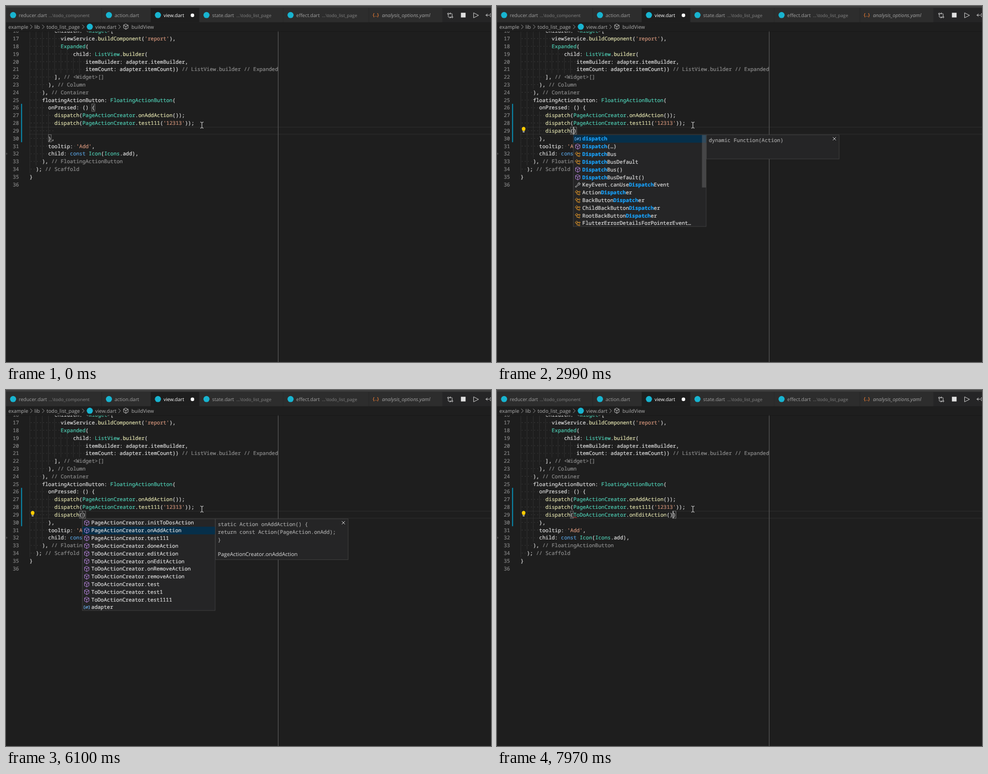
Animation, 874 px wide and 641 px high, one loop 8000 ms. Source, as an HTML page:

```html
<!DOCTYPE html>
<html lang="en">
<head>
<meta charset="utf-8">
<title>Editor completion</title>
<style>
html, body { margin: 0; width: 100%; height: 100%; overflow: hidden; background: #1e1e1e; }
svg { display: block; width: 874px; height: 641px; }
text { white-space: pre; text-rendering: geometricPrecision; }
.code { --ink: #dadada; font: 9.333px "Noto Sans Mono", monospace; }
.code, .code tspan { fill: var(--ink); stroke: var(--ink); stroke-width: .22px; }
.ui { font-family: "Open Sans", sans-serif; }
.num { --ink: #858585; text-anchor: end; }
.com { --ink: #8a8a8a; }
.str { --ink: #ce9178; }
.key { --ink: #569cd6; }
.type { --ink: #4ec9b0; }
.fn { --ink: #dcdcaa; }
.hit { --ink: #18a3ff; font-weight: bold; }
.doc { --ink: #a3a3a3; }
.line { fill: none; stroke-linejoin: round; stroke-linecap: round; }
</style>
</head>
<body>
<svg viewBox="0 0 874 641">
  <g id="page"></g>
  <g id="live"></g>
  <g id="popup"></g>
  <g id="chrome"></g>
  <path class="line" stroke="#d8d8d8" stroke-width="1" d="M350.500 209Q353 209 353 210.500V218.500Q353 220 350.500 220M355.500 209Q353 209 353 210.500M353 218.500Q353 220 355.500 220"/>
</svg>
<script>
const X0 = 42.5, CW = 5.6, LH = 13.82, ROW = 29;
const $ = id => document.getElementById(id);
const colX = c => X0 + c * CW;
const lineY = n => 58.7 + (n - 17) * LH;
const esc = s => s.replace(/&/g, '&amp;').replace(/</g, '&lt;');
const rect = (x, y, w, h, fill, more = '') =>
  `<rect x="${x}" y="${y}" width="${w}" height="${h}" fill="${fill}" ${more}/>`;
const stroke = (d, color, w = 0.8) =>
  `<path class="line" d="${d}" stroke="${color}" stroke-width="${w}"/>`;
const at = (x, y, body) => `<g transform="translate(${x} ${y})">${body}</g>`;
const disc = (x, y, r, fill) => `<circle cx="${x}" cy="${y}" r="${r}" fill="${fill}"/>`;
const mono = (x, y, markup, cls = '') =>
  `<text class="code ${cls}" x="${x}" y="${y + 3.4}">${markup}</text>`;
const ui = (x, y, s, size, fill, more = '') =>
  `<text class="ui" x="${x}" y="${y + 3.3}" font-size="${size}" fill="${fill}" ${more}>${esc(s)}</text>`;

const TOKEN = /(\/\/.*)|('[^']*')|(\bconst\b)|(\b[A-Z]\w+)|(\b[a-z]\w*(?=\())/g;
const KINDS = ['com', 'str', 'key', 'type', 'fn'];

function highlight(s) {
  let out = '', last = 0;
  for (const m of s.matchAll(TOKEN)) {
    const kind = KINDS[m.slice(1).findIndex(Boolean)];
    out += esc(s.slice(last, m.index)) + `<tspan class="${kind}">${esc(m[0])}</tspan>`;
    last = m.index + m[0].length;
  }
  return out + esc(s.slice(last));
}

// Text with its indent guides and whitespace dots
function codeLine(n, indent, s) {
  const y = lineY(n);
  let guides = '', dots = '';
  for (let c = 0; c < indent; c++) {
    if (c % 2 === 0) guides += `M${colX(c) + 0.4} ${y - LH / 2}v${LH}`;
    dots += `M${colX(c) + CW / 2} ${y}h.1`;
  }
  const src = s.split(' //')[0];
  for (let i = 0; i < src.length; i++)
    if (src[i] === ' ') dots += `M${colX(indent + i) + CW / 2} ${y}h.1`;
  return stroke(guides, '#363636', 0.73) + stroke(dots, '#484848', 1.2) +
    mono(colX(indent), y, highlight(s));
}

const box = (n, c) =>
  rect(colX(c) + 0.2, lineY(n) - 6.5, CW - 0.2, LH - 0.9, 'none', 'stroke="#888" stroke-width=".75"');

function squiggle(from, to) {
  const y = lineY(ROW) + 5.6;
  let d = `M${colX(from)} ${y}`;
  for (let i = 1, x = colX(from) + 1.45; x <= colX(to) + 0.3; x += 1.45, i++)
    d += `L${x} ${y - (i % 2) * 1.6}`;
  return stroke(d, '#f14c4c', 0.8);
}

const icons = {
  cube: (color = '#b180d7') =>
    stroke('M0-4.600L4-2.600V2.400L0 4.600L-4 2.400V-2.600ZM-4-2.600L0-.4L4-2.600M0-.4V4.600', color, 0.9),
  cls: () => stroke('M-4.300-1.700L-1.700-4.200L.2-2.300L-2.400.3ZM-.5-1.500H2M-1.400-.6V3H1.600M2-1.500L3.200-2.700L4.600-1.400L3.300-.1ZM1.600 3L2.900 1.700L4.300 3L3 4.300Z', '#ee9d28', 0.95),
  field: () => stroke('M-3.400-2.600H-4.800V2.600H-3.400M3.400-2.600H4.800V2.600H3.400M-2 0A2 1.700 0 1 1 2 0A2 1.700 0 1 1-2 0M-2 1.700L2-1.700', '#75beff', 0.85),
  tool: () => stroke('M-4 3L.2-1.200A2.600 2.600 0 0 1 3.300-4.200L1.700-2.500L2.800-1.400L4.400-3A2.600 2.600 0 0 1 1.300.1L-2.900 4.200Q-4.300 4.400-4 3Z', '#c5c5c5', 0.85)
};

const SOURCE = [
  [8, 'children: <Widget>['],
  [10, "viewService.buildComponent('report'),"],
  [10, 'Expanded('],
  [14, 'child: ListView.builder('],
  [18, 'itemBuilder: adapter.itemBuilder,'],
  [18, 'itemCount: adapter.itemCount)) // ListView.builder // Expanded'],
  [8, '], // <Widget>[]'],
  [6, '), // Column'],
  [4, '), // Container'],
  [4, 'floatingActionButton: FloatingActionButton('],
  [6, 'onPressed: () {'],
  [8, 'dispatch(PageActionCreator.onAddAction());'],
  [8, "dispatch(PageActionCreator.test111('12313'));"],
  null,
  [6, '},'],
  [6, "tooltip: 'Add',"],
  [6, 'child: const Icon(Icons.add),'],
  [4, '), // FloatingActionButton'],
  [2, '); // Scaffold'],
  [0, '}'],
  [0, '']
];

function drawPage() {
  const top = lineY(ROW) - LH / 2;
  let out = rect(42, top, 832, 1.2, '#2b2b2b') + rect(42, top + LH - 1.2, 832, 1.2, '#2b2b2b');
  out += rect(490, 45, 1, 596, '#5a5a5a');
  out += rect(27, lineY(26) - LH / 2, 2.1, LH * 5, '#0c7d9d');
  SOURCE.forEach((row, i) => {
    const n = 16 + i;
    out += mono(23.4, lineY(n), n, 'num');
    if (row) out += codeLine(n, ...row);
  });
  return out + stroke('M0 266H2.500M1 264.500V267.500', '#5c5c5c', 0.7);
}

const DART = '#18b4d0';
// left edge, right edge, name, folder, folder x
const TABS = [
  [0, 172, 'reducer.dart', '...\\todo_component', 77],
  [172.7, 260.5, 'action.dart'],
  [261, 348, 'view.dart'],
  [348.5, 499.5, 'state.dart', '...\\todo_list_page', 415],
  [500, 653.5, 'effect.dart', '...\\todo_list_page', 569.5],
  [654.3, 786.5, 'analysis_options.yaml']
];

function drawChrome() {
  let out = rect(0, 0, 874, 45.5, '#1e1e1e') + rect(0, 45.5, 874, 1, '#161616', 'opacity=".6"') +
    rect(0, 0, 874, 3.6, '#3c3c3c') + rect(0, 3.6, 874, 25.6, '#252526');
  TABS.forEach(([x, end, name, folder, fx], i) => {
    const active = i === 2, yaml = i === 5;
    out += rect(x, 3.6, end - x, 25.6, active ? '#1e1e1e' : '#2d2d2d');
    out += yaml ? ui(x + 6.5, 15.5, '{..}', 8.5, '#e37933', 'font-weight="600"')
      : disc(x + 12.8, 16.3, 5.5, DART);
    out += yaml ? ui(677.5, 16.7, name, 9.05, '#a2a2a2', 'font-style="italic"')
      : ui(x + 23, 16.7, name, 8.75, active ? '#fff' : '#a2a2a2');
    if (folder) out += ui(fx, 16.7, folder, 8.05, '#848484');
  });
  out += disc(336, 16.7, 3.2, '#fff');

  const pale = '#d0d0d0';
  out += at(800.5, 17, stroke('M-3.500-1.500V2Q-3.500 3.500-2 3.500H1M-.5 2L1 3.500L-.5 5M3.500 1.500V-2Q3.500-3.500 2-3.500H-1M.5-5L-1-3.500L.5-2M-4.800-3A1.300 1.300 0 1 1-2.200-3A1.300 1.300 0 1 1-4.800-3M2.200 3A1.300 1.300 0 1 1 4.800 3A1.300 1.300 0 1 1 2.200 3', pale, 0.9));
  out += rect(819.8, 12.2, 8.4, 8.4, '#e0e0e0');
  out += stroke('M843 12.500L851.500 16.800L843 21.100Z', pale, 0.95);
  out += stroke('M870 16.500H865M867.500 14L865 16.500L867.500 19M874.500 13A3.700 3.700 0 0 0 874.500 20', pale, 0.95);

  const crumb = (x, s) => ui(x, 37.5, s, 9, '#b0b0b0');
  out += crumb(4.3, 'example') + crumb(51, 'lib') + crumb(73, 'todo_list_page') +
    crumb(160.8, 'view.dart') + crumb(226, 'buildView');
  for (const x of [44, 65.5, 137.5, 203])
    out += stroke(`M${x} 34l3.300 3.500l-3.300 3.500`, '#a0a0a0', 0.9);
  return out + disc(151, 37.3, 5.5, DART) + at(216, 37.3, icons.cube('#c5c5c5'));
}

const creators = ['initToDosAction', 'onAddAction', 'test111'].map(s => 'PageActionCreator.' + s)
  .concat(['doneAction', 'editAction', 'onEditAction', 'onRemoveAction', 'removeAction',
    'test', 'test1', 'test1111'].map(s => 'ToDoActionCreator.' + s));
const LISTS = {
  names: [
    ['field', 'dispatch'], ['cube', 'Dispatch(…)'], ['cls', 'DispatchBus'],
    ['cls', 'DispatchBusDefault'], ['cube', 'DispatchBus()'], ['cube', 'DispatchBusDefault()'],
    ['tool', 'KeyEvent.canUseDispatchEvent'], ['cls', 'ActionDispatcher'],
    ['cls', 'BackButtonDispatcher'], ['cls', 'ChildBackButtonDispatcher'],
    ['cls', 'RootBackButtonDispatcher'], ['cls', 'FlutterErrorDetailsForPointerEvent…']
  ],
  actions: [...creators.map(s => ['cube', s]), ['field', 'adapter']]
};
const DOCS = [
  ['initToDosAction(List<ToDoState> toDos)', 'Action(PageAction.initToDos, payload: toDos)'],
  ['onAddAction()', 'const Action(PageAction.onAdd)'],
  ['test111(String str)', 'Action(PageAction.test111, payload: str)'],
  ['doneAction(String uniqueId)', 'Action(ToDoAction.done, payload: uniqueId)'],
  ['editAction(ToDoState toDo)', 'Action(ToDoAction.edit, payload: toDo)'],
  ['onEditAction(String uniqueId)', 'Action(ToDoAction.onEdit, payload: uniqueId)']
];
const FRAME = 'stroke="#454545" stroke-width=".75"';
const wrap = s => s.match(/.{1,38}/g);

function drawDocs(s) {
  const named = s.list === 'names';
  const [head, body] = DOCS[s.sel];
  const lines = named ? ['dynamic Function(Action)']
    : [`static Action ${head} {`, `return ${body};`, '}'].flatMap(wrap);
  const last = 242 + (lines.length - 1) * LH;
  const bottom = last + (named ? 33.3 : 35.7);
  let out = rect(377.4, 232, 239.3, bottom - 232, '#252526', FRAME);
  lines.forEach((t, i) => out += mono(381.7, 242 + i * LH, esc(t), 'doc'));
  if (!named) out += ui(381.7, last + 26, creators[s.sel], 9.6, '#e0e0e0');
  return out + stroke('M605.500 236.500l5 5m0-5l-5 5', '#d0d0d0', 0.95);
}

function drawPopup(s) {
  if (!s.list) return '';
  if (s.list === 'loading')
    return rect(137.4, 232, 239.5, 14.2, '#252526', FRAME) + mono(154, 239, 'Loading...');
  let out = rect(137.4, 232, 239.5, 165, '#252526', FRAME);
  out += rect(137.8, 232.3 + s.sel * LH, 238.8, LH, '#062f4a');
  LISTS[s.list].forEach(([icon, label], i) => {
    const y = 239 + i * LH;
    let markup = esc(label);
    if (s.list === 'names') markup = markup.replace(/dispatch/i, '<tspan class="hit">$&</tspan>');
    out += at(145.500, y + 0.3, icons[icon]()) + mono(153.8, y, markup);
  });
  out += rect(369.4, 232.3, 7.3, s.list === 'names' ? 94.5 : 14.5, '#797979', `opacity="${0.4 * s.thumb}"`);
  return out + (s.docs ? drawDocs(s) : '');
}

function drawLive(s) {
  let out = codeLine(ROW, 8, s.text);
  if (s.braces) out += box(26, 20) + box(30, 6);
  if (s.close) out += box(ROW, 16) + box(ROW, s.close);
  if (s.wavy) out += squiggle(...s.wavy);
  if (s.on) out += rect(colX(s.col) - 0.3, lineY(ROW) - 6.7, 1.2, 13.4, '#d0d0d0');
  if (s.bulb) out += at(48, 222.6,
    '<path fill="#ffcc00" d="M0-5A3.700 3.700 0 0 1 2 1.600V2.500H-2V1.600A3.700 3.700 0 0 1 0-5Z"/>' +
    rect(-1.6, 3.1, 3.2, 1.7, '#d8d8d8'));
  return out;
}

const typed = n => ({ text: 'dispatch'.slice(0, n), col: 8 + n, on: true });
// Each step adds to the state before it
const STEPS = [
  [0, { text: '', col: 8, on: false, braces: true, close: 0, wavy: null, bulb: false,
        list: '', sel: 0, docs: false, thumb: 1 }],
  [250, { on: true }],
  [340, typed(1)], [440, typed(2)], [540, { wavy: [8, 10] }], [630, typed(3)],
  [950, typed(4)], [1100, typed(5)], [1250, typed(6)],
  [1650, typed(7)], [1800, typed(8)],
  [2350, { text: 'dispatch()', col: 17, braces: false }],
  [2450, { close: 17 }],
  [2560, { wavy: null }],
  [2670, { bulb: true }],
  [2780, { list: 'names' }],
  [2990, { docs: true }],
  [3140, { list: '' }],
  [3450, { list: 'loading' }],
  [3670, { on: false }],
  [4380, { list: 'actions', thumb: 0.5 }],
  [4470, { thumb: 1 }],
  [4610, { on: true }],
  [5070, { thumb: 0.8 }], [5150, { thumb: 0.65, on: false }],
  [5450, { thumb: 0.3 }], [5620, { thumb: 0, on: true }],
  [6100, { sel: 1, on: false }], [6250, { sel: 2 }], [6420, { sel: 3 }],
  [6600, { sel: 4, on: true }], [6780, { sel: 5 }],
  [7100, { on: false }], [7570, { on: true }],
  [7880, { text: 'dispatch(ToDoActionCreator.onEditAction())', col: 49, close: 49, list: '' }],
  [7970, { wavy: [17, 18] }]
];
const states = [];
STEPS.forEach(([, change], i) => states.push({ ...states[i - 1], ...change }));

$('page').innerHTML = drawPage();
$('chrome').innerHTML = drawChrome();

let shown = -1;
const start = performance.now();
function tick() {
  const t = (performance.now() - start) % 8000;
  const i = STEPS.findLastIndex(([from]) => from <= t);
  if (i !== shown) {
    shown = i;
    $('live').innerHTML = drawLive(states[i]);
    $('popup').innerHTML = drawPopup(states[i]);
  }
  requestAnimationFrame(tick);
}
tick();
</script>
</body>
</html>
```
